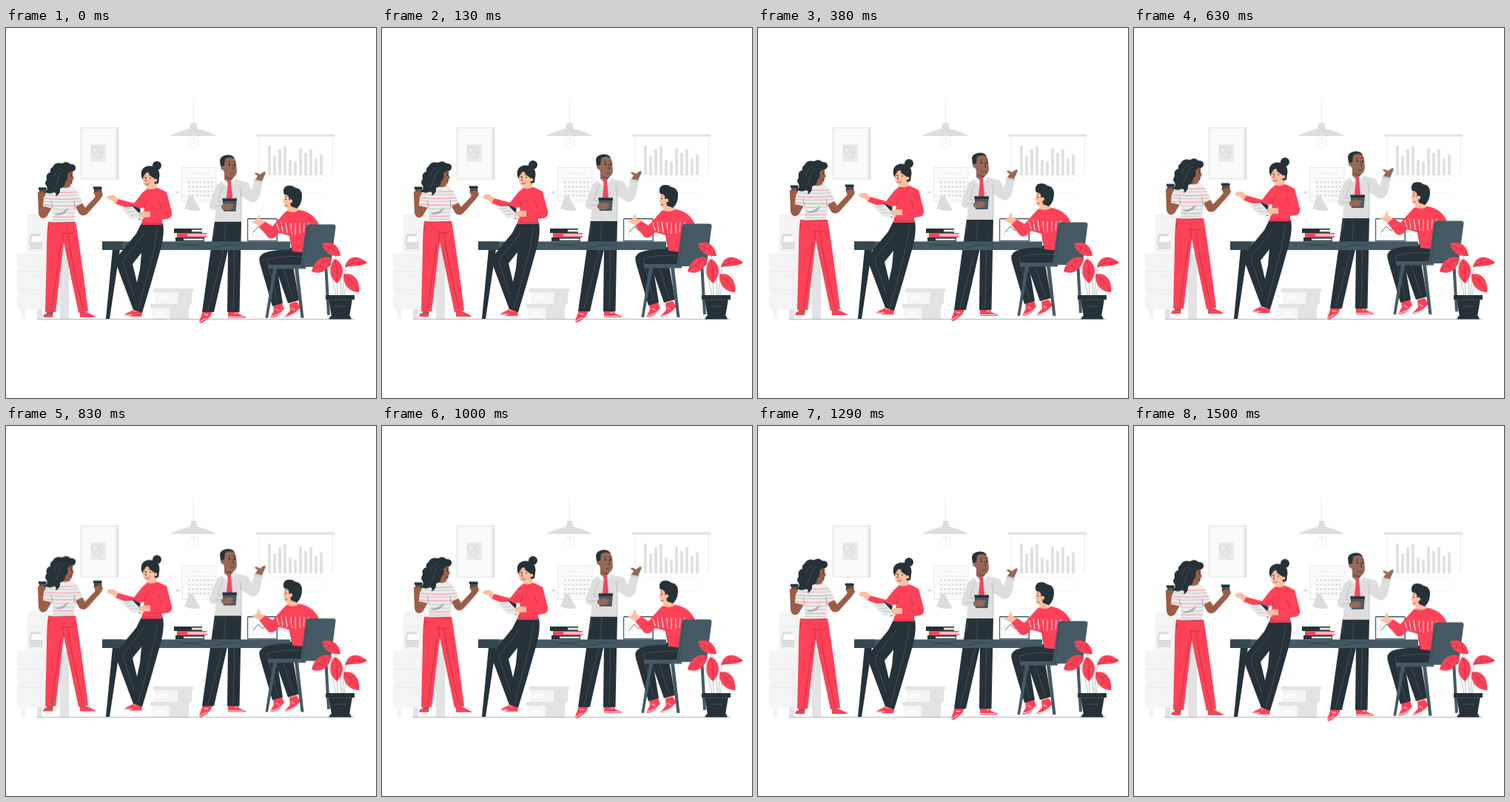
An HTML page that plays this animation: 500x500 px, repeating every 1540 ms.

```html
<!DOCTYPE html>
<html lang="en">
<head>
<meta charset="utf-8">
<title>Office talk</title>
<style>
html,body{margin:0;width:100%;height:100%;overflow:hidden;background:#fff}
svg{display:block;width:100vw;height:100vh}
path{stroke-linecap:round;stroke-linejoin:round}
.float{animation:float 1.54s linear infinite}
@keyframes float{50%{transform:translateY(-6px)}}
.red{fill:#ff4258}.dark{fill:#263238}.slate{fill:#455a64}
.g1{fill:#fafafa}.g2{fill:#f4f4f4}.g3{fill:#e3e3e3}.white{fill:#fff}
.shirt{fill:#dedede}.skin{fill:#ffbfa0}.brown{fill:#9c5d47}.tan{fill:#976855}
.ln{fill:none;stroke:#e6e6e6;stroke-width:.8}
.ink{fill:none;stroke:#263238;stroke-width:.7}
.seam{fill:none;stroke:#56646b;stroke-width:.6}
.fold{fill:none;stroke:#9d2937;stroke-width:.6}
.pale{fill:none;stroke:#fff;stroke-width:1}
.flat{fill:none;stroke:#e0e0e0;stroke-linecap:butt}
</style>
</head>
<body>
<svg viewBox="0 0 500 500">
<defs>
  <clipPath id="top"><path d="M60 216Q72 212 88 213Q97 218 104 238L94 244 92 262 63 263 63 244 50 241Q51 226 60 216Z"/></clipPath>
</defs>

<!-- room -->
<g id="frame">
  <path class="g2" d="M101 134h51v71h-51z"/>
  <path class="g3" d="M149 134h3.500v71h-3.500z"/>
  <path class="g1" d="M104 137h43v65h-43z"/>
  <path class="ln" d="M101.500 134.500h48v70h-48z"/>
  <path fill="#ebebeb" d="M114 157h21v24h-21z"/>
  <g fill="none" stroke="#d6d6d6" stroke-width=".7">
    <circle cx="121" cy="165" r="4"/><circle cx="128" cy="165" r="4.500"/>
    <circle cx="125" cy="171" r="5"/><path d="M117 160h11v13h-11z"/>
  </g>
</g>
<g id="lamp">
  <path class="ln" d="M253.500 96V129"/>
  <circle class="ln" cx="253.500" cy="156" r="6.500"/>
  <path class="ln" d="M253.500 148v7l-2 2m2-2 2 2"/>
  <path fill="#dedede" d="M250 128h7l1.500 8Q272 139 285 146H221Q235 139 248.500 136Z"/>
</g>
<g id="board">
  <path class="ln" stroke-dasharray="1.500 1" d="M341.500 147V222M441.500 147V196"/>
  <path class="g3" d="M338 143.500h106v3.200H338z"/>
  <path class="flat" stroke-width="3.800" d="M356 199V159M363 199V173M370 199V164M377 199V160M384 199V178M391 199V181M398 199V163M405 199V169M412 199V164M419 199V176M426 199V171"/>
  <path class="ln" stroke-dasharray="4 3" d="M354 205H428"/>
  <path class="ln" d="M372 223H428" opacity=".7"/>
</g>
<g id="calendar">
  <path class="g1" d="M237 188h47v46h-47z"/>
  <path class="ln" d="M237.500 234V188.500H284V234ZM237.500 203H284M247 197H270"/>
  <path class="flat" stroke-width="3" stroke-dasharray="3 2.200" d="M246 208.500H280M246 214.500H280M246 220.500H280M246 226.500H280"/>
  <path class="ln" d="M214 231 232 222 249 230"/>
  <circle cx="232" cy="222" r="2" fill="#ddd"/>
  <path fill="#dcdcdc" d="M248 226 252 227 263 246Q252 249 241 244Z"/>
</g>
<g id="printer">
  <path class="g2" d="M29 251h31v26H29zM28 277h34v26H28z"/>
  <path class="ln" d="M33 256H55M33 272H55"/>
  <path fill="#dedede" d="M32 282q0-4 5-4h10v3h-9q-3 0-3 4v4h15l-1 10H32l-1-10z"/>
  <path class="white" d="M35 282h13v7H34z"/>
  <path class="g2" d="M15 304h60v76H15zM20 380h7v13h-7z"/>
  <path class="g3" d="M73 304h12v89H73zM42 380h7v13h-7z"/>
  <path class="ln" d="M15.500 328.500H73M15.500 353.500H73M38 311h14M38 335h14M38 360h14"/>
</g>
<g id="boxes">
  <path class="g2" d="M201 357h37v16h-37zM197 378h29v15h-29z"/>
  <path class="g3" d="M199 352h54v5h-54zM232 357h19v16h-19zM195 373h53v5h-53zM221 378h26v15h-26z"/>
  <path class="white" d="M204 360h14v8h-14zM201 382h14v8h-14z"/>
  <path class="ln" d="M206 361h10v5h-10zM203 383h10v5h-10z"/>
</g>
<path d="M42 393.500H470" stroke="#a4a9ac" stroke-width=".8"/>

<!-- standing man -->
<g class="float">
  <path class="red" d="M266 383 279 383 276 390Q270 396 264 399Q260 399 262 394ZM300 383H313L315 387 323 390Q325 392 322 392H300Z"/>
  <path class="pale" d="M262 397 271 392M300 390.500H321M268 387l5 1M309 386l3-1"/>
  <path class="dark" d="M282 261H318L315.500 384H299L300 300 281 384H265L276 305Z"/>
  <path class="seam" d="M297 263 294 300 273 381M309 300 307 381M284 265 281 280"/>
  <path class="shirt" d="M293 206 308 204 327 209 332 219 337 203 347 207 343 227Q339 238 330 235L318 227 318 262H282L284 240 287 211Z"/>
  <path class="shirt" d="M288 210Q284 211 282 219L275 238Q274 246 282 246L298 246 296 234 286 234Z"/>
  <path d="M281 241 292 240M293 214 286 234 292 235M318 227 316 214M318 262Q318 244 318 227M335 206 347 209" fill="none" stroke="#a9a9a9" stroke-width=".6"/>
  <path class="tan" d="M295 195H307V206L301 212 295 206Z"/>
  <path fill="#6d4538" d="M296 199Q301 204 307 202V205Q299 205 296 199Z"/>
  <path class="tan" d="M290 179Q290 173 300 173Q310 174 311 182L312 194Q311 202 305 203Q297 202 294 193L291 190Z"/>
  <path class="dark" d="M289 179Q290 172 300 171.500Q308 172 309 177Q303 173 296 177L295 186 292 188 290 187Z"/>
  <circle class="tan" cx="293" cy="189" r="2.700"/>
  <path class="ink" d="M300 182l3-1M307 181l3 0M303 197q3 1 5-1M306 185l2 6h-3"/>
  <circle cx="302" cy="185" r=".9"/><circle cx="309" cy="185" r=".9"/>
  <path class="white" d="M294 204 301 209 296 213 292 207ZM307 203 301 209 305 213 309 206Z"/>
  <path class="red" d="M298 206 304 206 304 210 306 229 302 235 298 229 300 211Z"/>
  <path class="slate" d="M292.500 230.500H312L310.500 248H294Z"/>
  <path class="dark" d="M292.500 230.500H312L311.500 234H293Z"/>
  <path class="tan" d="M291 240 298 237 307 238 309 240 304 241 308 243 302 246 294 246 291 244Z"/>
  <path class="tan" d="M337 205 340 200 336 197Q337 194 343 198L349 194Q352 195 350 198L346 207Z"/>
</g>

<!-- table -->
<path class="dark" d="M144 299h10L140 393H135Z"/>
<path class="slate" d="M130 288.500H384V300H130Z"/>
<path fill="#37474f" d="M130 288.500h28v11.500h-28z"/>
<path class="ink" opacity=".5" d="M228 291q18 4 32 1t34 0 26-1M232 296q14-4 30 0t28-1 28 1M240 294q12-2 20 0M275 294q12 2 24 0"/>
<g id="books">
  <path class="dark" d="M227 271h38v6h-38z"/><path fill="#e5e5e5" d="M251 272.500h15v3h-15z"/>
  <path class="red" d="M231 277h40v6h-40z"/><path fill="#ffd9dc" d="M245 278.500h26v3h-26z"/>
  <path class="dark" d="M229 283h39v5.500h-39z"/><path fill="#e5e5e5" d="M240 284.500h27v2.500h-27z"/>
</g>
<g id="laptop">
  <path class="slate" d="M327.500 257h37.500q2 0 2 2v29.500h-41V259q0-2 1.500-2z"/>
  <path class="white" d="M327.200 258.500h38.300v28.500h-38.300z"/>
  <path class="ln" d="M333 281H361M333 263V281"/>
  <path class="ink" d="M334 276 341 268 347 274 354 265 361 270"/>
</g>

<!-- woman with cups -->
<g class="float">
  <path class="brown" d="M52 239 62 243 55 255Q47 261 44 251L43 225 50 219 54 224 51 230 50 242Z"/>
  <path class="dark" d="M44 215.500h10l1 2.500-1 1v4.500H45v-4.500l-1.500-1z"/>
  <path class="slate" d="M45 219h9.500v2H45z"/>
  <path class="brown" d="M43 222 51 221 54 224 50 228 43 227ZM55 382H64L63 389 55 388ZM99 382 107 382 109 388 101 389Z"/>
  <path class="red" d="M53 386 63 388 63 392H50Q50 388 53 386ZM100 386 109 384 119 389Q122 391 120 392H100Z"/>
  <path class="pale" d="M50 391.500H63M100 391.500H120"/>
  <path class="red" d="M57 262 94 262Q99 290 111 383L98 385 78 290 67 384H53L55 300Q55 276 57 262Z"/>
  <path class="fold" d="M78 290 76 276M74 293 62 380M84 279Q89 320 104 379M58 266 57 274M75 276Q82 280 91 276"/>
  <g clip-path="url(#top)">
    <path fill="#ebebeb" d="M48 210h60v56H48z"/>
    <path d="M48 221q28 3 58 0M48 230q28 3 58 0M48 239q28 3 58 0M48 254q28 3 58 0" fill="none" stroke="#ff8f99" stroke-width="1"/>
    <path d="M48 225q28 3 58 0M48 234q28 3 58 0M48 244q28 3 58 0M48 249q28 3 58 0M48 258q28 3 58 0" fill="none" stroke="#c8c8c8" stroke-width="1"/>
    <path fill="#ababab" d="M65 252Q78 250 84 243 82 253 69 253Z"/>
  </g>
  <path class="ink" opacity=".5" d="M63 244 61 234M93 244 92 234M63 263H92"/>
  <path class="brown" d="M94 242 103 237 107 243 120 229 122 224 129 220 131 226 127 232 110 251Q104 256 99 251Z"/>
  <path class="dark" d="M118 214.500h11l1 2.500-1 1v4.500h-10v-4.500l-1.500-1z"/>
  <path class="slate" d="M119 218h10v2h-10z"/>
  <path class="brown" d="M118 222 127 220 130 224 121 228Z"/>
  <path class="brown" d="M77 204 87 206 87 214Q81 218 75 215Z"/>
  <path class="brown" d="M78 193Q85 188 90 193L90 199 92 204 90 205 89 211Q83 213 78 209Z"/>
  <path class="ink" d="M87 197l3-.5M87 208q2 0 3-1"/><circle cx="88.500" cy="200" r=".8"/>
  <path class="dark" d="M63 188Q66 181 76 183Q82 179 87 184Q95 184 94 190Q93 195 87 194Q85 197 83 197Q85 205 80 208Q80 216 73 217Q74 224 67 228Q69 223 65 222Q58 226 52 221Q57 220 55 214Q51 210 55 205Q53 197 60 195Q59 190 63 188Z"/>
  <path class="seam" d="M79 193Q72 195 71 203T65 216M74 190Q66 193 65 202"/>
</g>

<!-- woman with notebook -->
<g class="float">
  <path class="skin" d="M173 379h9l-1 7h-9z"/>
  <path class="red" d="M172 381 174 386 172 389H161Q159 388 162 386ZM174 383 184 384 183 391H168Q166 390 169 388Z"/>
  <path class="pale" d="M161 388H170M168 390.500H182"/>
  <path class="dark" d="M183 264H212Q215 280 207 306L196 345 184 385 172 381 150 322Q148 314 153 306L176 278Z"/>
  <path class="white" d="M183 304 171 319 177 344 181 326Z"/>
  <path class="seam" d="M205 270Q201 300 192 330L179 379M188 276Q175 294 160 311L158 317 173 362"/>
  <path class="red" d="M190 218Q199 214 207 217L217 222 224 249Q225 256 219 258L211 259 211 266H183L187 243 174 245Q160 243 147 237L151 231 173 237 184 223Z"/>
  <path class="fold" d="M206 234 211 247 196 249M187 243 190 232M184 263Q198 266 211 263"/>
  <path class="skin" d="M152 231 148 238 143 233 137 231Q135 228 140 226L146 226Z"/>
  <path class="dark" d="M171 240 182 245 181 249 186 257 180 259 157 244Z"/>
  <path fill="#e9e9e9" d="M155 243 171 241 187 258 169 258Z"/>
  <path class="ln" style="stroke:#bbb" d="M161 245 170 244M164 249 174 248M168 253 178 252"/>
  <path class="red" d="M193 247 216 245 219 258 194 257Z"/>
  <path class="skin" d="M195 248 195 256 183 256 178 254 182 252 179 250 185 248Z"/>
  <circle class="dark" cx="204" cy="186" r="6"/>
  <path class="skin" d="M193 209H204L203 218Q197 221 191 217Z"/>
  <path class="red" d="M190 217Q197 220 204 216L205 222 190 222Z"/>
  <path class="skin" d="M185 194Q194 189 201 195L203 207Q201 216 193 216 185 214 185 206Z"/>
  <path class="dark" d="M183 201Q181 188 193 186.500 207 186 207.500 199L206 210 201 211 200 203Q194 200 192 195 186 196 185 205Z"/>
  <circle class="skin" cx="202" cy="206" r="2.300"/>
  <path class="ink" d="M186.500 199l2-.5M193 199l3 .5M190 202l-2 5h2M189 211q3 2 5-1"/>
  <circle cx="188" cy="202" r=".8"/><circle cx="195" cy="203" r=".8"/>
</g>

<!-- seated man -->
<g class="float">
  <path class="slate" d="M430 318 434 318 438 388 434 388Z"/>
  <path class="skin" d="M361 370 371 370 371 377 364 379ZM381 369 391 367 393 374 385 377Z"/>
  <path class="red" d="M361 374 373 372 376 380 370 387Q362 393 357 391L362 382ZM383 373 393 370 398 378 392 384Q382 392 376 391L384 382Z"/>
  <path class="pale" d="M358 390Q368 389 375 381M378 390Q389 389 397 379M365 380l4 2M386 379l4 2"/>
  <path class="dark" d="M384 297 407 298 407 321 388 322 396 368 381 372 368 335 374 372 360 376 343 318Q340 308 349 304Q365 299 384 300Z"/>
  <path class="seam" d="M400 309Q370 307 353 313L367 370M363 321 367 333M375 326 388 366"/>
  <path class="red" d="M378 248Q388 244 397 246 414 249 422 264L424 282 407 304 387 302 383 281 369 277Q361 288 354 283L342 268 349 261 360 268Z"/>
  <path class="pale" d="M366 265 369 274M372 263 374 276M378 263 380 277M385 264 386 278M391 264 391 279M397 264 397 278M403 264 402 276M409 264 407 273M414 266 412 272"/>
  <path class="fold" d="M383 281 387 272M387 302 384 284"/>
  <path class="skin" d="M343 268 335 264 331 262 338 260 341 253Q344 252 343 258L350 262Z"/>
  <path class="skin" d="M381 236 394 236 395 247Q387 251 380 247Z"/>
  <path class="skin" d="M377 224Q386 218 391 226V238Q387 245 381 244 376 243 376 237L374 234 376 231Z"/>
  <path class="ink" d="M377 228l2 0M377 240l3 0"/><circle cx="378" cy="231.500" r=".8"/>
  <path class="dark" d="M376 225Q373 218 378 214 386 211 391 216 400 217 400 227 400 238 393 244L385 241Q384 234 382 232 384 226 376 225Z"/>
  <circle class="skin" cx="384.500" cy="234" r="2.600"/>
  <path class="slate" d="M354 320H405V325.500H354ZM361 325H366L354 392H350.500ZM390 325H395L402.500 392H398.500Z"/>
  <path class="slate" d="M410 265.500H442Q446 265.500 445.500 269L439 319Q438 323 434 323H398L405 270Q406 265.500 410 265.500Z"/>
  <path class="ink" opacity=".5" d="M413 266.500Q409 266 408 271L401 322"/>
</g>

<!-- plant -->
<g id="plant">
  <path d="M448 362Q448 350 447 340M453 362Q453 325 443 303M455 362Q455 335 461 321M457 362Q458 348 463 341M446 362Q442 335 432 320" fill="none" stroke="#a9aeb0" stroke-width=".8"/>
  <path class="red" d="M427 292C433 287 450 289 452 308C441 309 431 306 427 292Z"/>
  <path class="red" d="M458 323C462 307 475 306 488 317C480 323 468 321 458 323Z"/>
  <path class="red" d="M440 311C432 307 417 310 413 329C424 334 437 328 440 311Z"/>
  <path class="red" d="M447 345C436 336 436 321 444 312C456 317 460 333 447 345Z"/>
  <path class="red" d="M456 333C464 330 479 335 477 357C464 357 455 347 456 333Z"/>
  <path class="fold" d="M428 293Q441 297 451 307M436 297l-1 4M443 301l1-7M459 322Q471 315 486 317M468 317l3-5M476 316l2 4M439 312Q427 316 414 328M429 317l-1-5M423 321l6 3M447 343Q449 329 445 314M448 332l-5-4M448 327l4-4M457 334Q468 342 476 355M464 340l5-2M468 345l-4 3"/>
  <path class="dark" d="M432 361h39v6h-39zM436 366h32l-4 24h-24zM439 389h26l2 4.500h-31z"/>
  <path class="seam" d="M437 367.500H467M444 376H460"/>
</g>
</svg>
</body>
</html>
```
